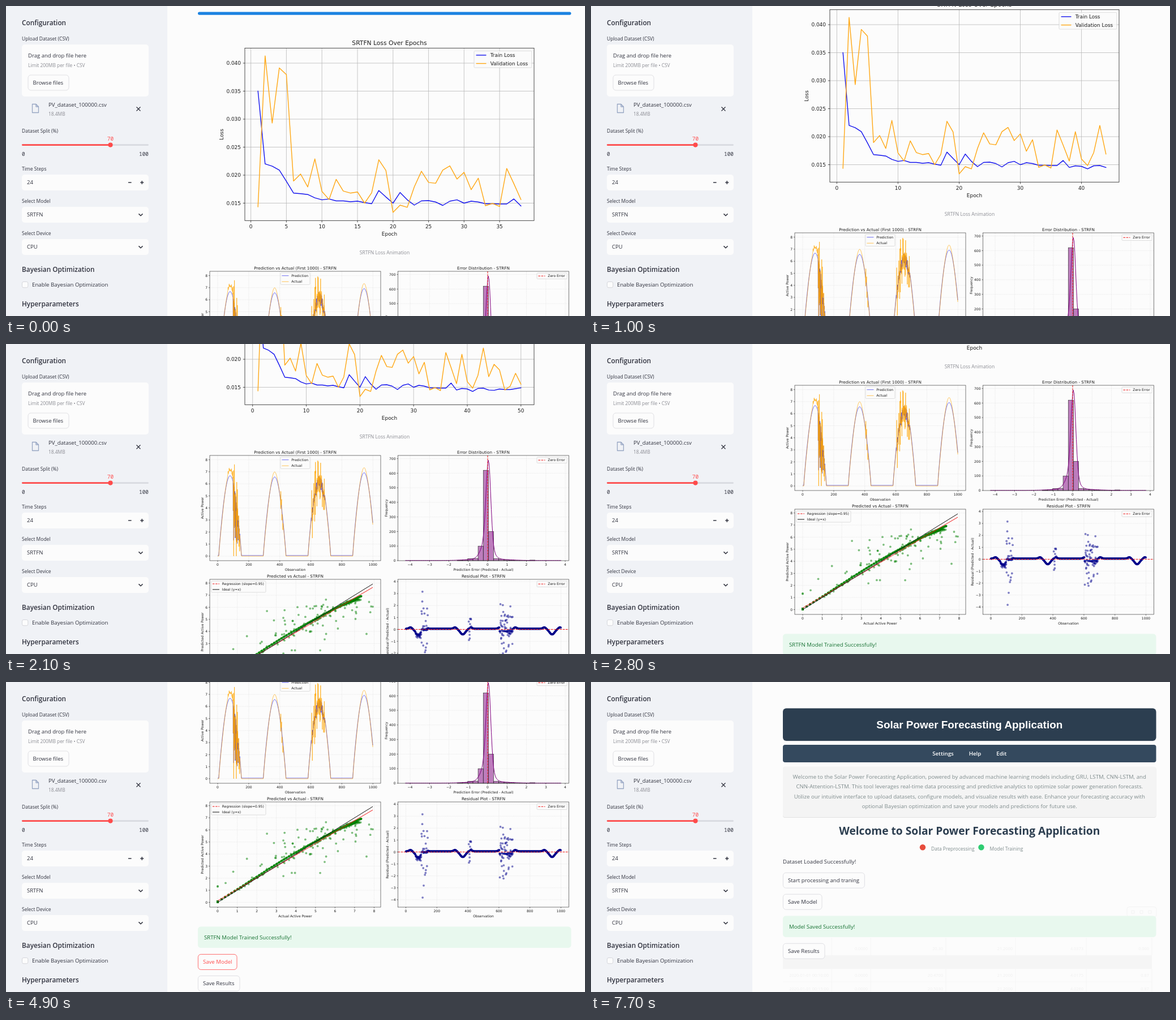
Write an HTML page that moves like this. It is 1023 by 548 pixels and loops after 7.8 s.

```html
<!DOCTYPE html>
<html lang="en">
<head>
<meta charset="utf-8">
<title>Solar Power Forecasting</title>
<style>
  html, body { margin: 0; width: 100%; height: 100%; overflow: hidden; background: #fcfcfc; }
  svg { display: block; width: 1023px; height: 548px; }
  text { font-family: 'Open Sans', 'Noto Sans', sans-serif; fill: #31333f; white-space: pre; }
  .plot text { font-family: 'DejaVu Sans', sans-serif; fill: #1c1c1c; }
  text.mono { font-family: 'Noto Sans Mono', 'DejaVu Sans Mono', monospace; }
  text.head { font-family: 'Liberation Sans', Arial, sans-serif; }
  .btn rect { fill: #fcfcfc; stroke: #d8d9dd; stroke-width: .8; }
  .hot rect { stroke: #ff4b4b; }
  .hot text { fill: #ff4b4b; }
</style>
</head>
<body>
<svg id="stage" viewBox="0 0 1023 548"></svg>
<script>
const LOOP = 7800;
const INK = '#31333f', RED = '#ff4b4b', PAPER = '#fcfcfc', GREY = '#8c8d94';

// ---------- drawing helpers ----------
const attrs = (o = {}) => Object.entries(o).map(([k, v]) => ` ${k}="${v}"`).join('');
const rect = (x, y, w, h, o) => `<rect x="${x}" y="${y}" width="${w}" height="${h}"${attrs(o)}/>`;
const path = (d, stroke, width, o) =>
  `<path d="${d}" fill="none" stroke="${stroke}" stroke-width="${width}"${attrs(o)}/>`;
const dot = (x, y, r, o) => `<circle cx="${x}" cy="${y}" r="${r}"${attrs(o)}/>`;
// y is the optical middle of the line
const text = (s, x, y, size, o) =>
  `<text x="${x}" y="${(y + size * .36).toFixed(2)}" font-size="${size}"${attrs(o)}>${s}</text>`;
const mid = { 'text-anchor': 'middle' }, end = { 'text-anchor': 'end' };
const fill = (c, o = {}) => ({ style: `fill:${c}`, ...o });
const poly = pts => 'M' + pts.map(p => p[0].toFixed(1) + ' ' + p[1].toFixed(1)).join('L');
const range = (a, b, step = 1) => Array.from({ length: Math.floor((b - a) / step + 1.001) }, (_, i) => a + i * step);
const button = (s, x, y, w, id = '') =>
  `<g class="btn"${id && ` id="${id}"`}>${rect(x, y, w, 27, { rx: 5 })}${text(s, x + 8.5, y + 13.5, 9.65)}</g>`;
const notice = (s, y) =>
  rect(339, y, 659.5, 37.5, { rx: 5, fill: '#e8f8ee' }) + text(s, 350, y + 18.7, 9.65, fill('#177233'));

let seed = 11;
const rnd = () => {
  seed = seed + 0x6D2B79F5 | 0;
  let z = Math.imul(seed ^ seed >>> 15, 1 | seed);
  z = z + Math.imul(z ^ z >>> 7, 61 | z) ^ z;
  return ((z ^ z >>> 14) >>> 0) / 4294967296;
};
const burst = a => a * (2 * rnd() - 1) ** 3;

// ---------- sidebar ----------
function sidebar() {
  const heading = (s, y) => text(s, 28, y, 11.8, { 'font-weight': 600 });
  const label = (s, y) => text(s, 28, y, 8.5);
  const field = (s, y) => rect(28, y, 224, 28, { rx: 5, fill: PAPER }) + text(s, 37, y + 14, 9.5);
  const chevron = y => path(`M234.5 ${y - 1.6}l3.5 3.4 3.5 -3.4`, INK, 1.5);
  return rect(0, 0, 285, 548, { fill: '#f0f2f6' })
    + heading('Configuration', 30) + label('Upload Dataset (CSV)', 57.5)
    + rect(28, 68, 224, 92, { rx: 5, fill: PAPER })
    + text('Drag and drop file here', 39, 87.5, 9.55)
    + text('Limit 200MB per file • CSV', 39, 105, 8.4, fill(GREY))
    + button('Browse files', 39, 122, 72)
    + path('M46.5 173.5h6.5l4.5 4.5v10.5h-11zM53 173.5v4.5h4.5', '#97a6c3', 1.3, { 'stroke-linejoin': 'round' })
    + text('PV_dataset_100000.csv', 75, 175, 9.6) + text('18.4MB', 75, 190.5, 8.4, fill(GREY))
    + path('M230.5 178.5l7 7m0 -7l-7 7', INK, 1.3)
    + label('Dataset Split (%)', 221)
    + text('70', 184.5, 234.5, 9.4, fill(RED, { ...mid, class: 'mono' }))
    + rect(28, 244.2, 224, 2.7, { rx: 1.3, fill: '#d8dae0' }) + rect(28, 244.2, 156, 2.7, { rx: 1.3, fill: RED })
    + dot(184.5, 245.6, 4.1, { fill: RED })
    + text('0', 28, 261.5, 9.4, { class: 'mono' }) + text('100', 252, 261.5, 9.4, { ...end, class: 'mono' })
    + label('Time Steps', 288) + field('24', 298)
    + path('M216 312h5.6M237.3 312h6M240.3 309v6', INK, 1.5)
    + label('Select Model', 345) + field('SRTFN', 355) + chevron(369)
    + label('Select Device', 402) + field('CPU', 412) + chevron(426)
    + heading('Bayesian Optimization', 466)
    + rect(28.5, 487.5, 10.3, 10.3, { rx: 2.5, fill: PAPER, stroke: '#cdced5', 'stroke-width': .8 })
    + text('Enable Bayesian Optimization', 46, 492.5, 9.7)
    + heading('Hyperparameters', 527);
}

// ---------- charts ----------
// p: box, titles, ticks as [label, position] and label offsets
function axes(p) {
  const { x, y, w, h, fs } = p, b = y + h;
  let grid = '', marks = '', labels = '';
  for (const [s, px] of p.xt) {
    grid += `M${px} ${y}V${b}`;
    marks += `M${px} ${b}v${p.tick}`;
    labels += text(s, px, b + p.dx, fs, mid);
  }
  for (const [s, py] of p.yt) {
    grid += `M${x} ${py}h${w}`;
    marks += `M${x} ${py}h${-p.tick}`;
    labels += text(s, x - p.dy, py, fs, end);
  }
  return path(grid, p.grid, p.gw, p.dash && { 'stroke-dasharray': p.dash })
    + path(marks, '#222', p.lw) + labels
    + text(p.title, x + w / 2, y - p.dt, fs * 1.2, mid)
    + text(p.xl, x + w / 2, b + p.dl, fs, mid)
    + `<g transform="translate(${p.ylx} ${y + h / 2}) rotate(-90)">${text(p.yl, 0, 0, fs, mid)}</g>`;
}
const frame = p => rect(p.x, p.y, p.w, p.h, { fill: 'none', stroke: '#222', 'stroke-width': p.lw });
function legend(x, y, w, h, fs, lw, items) {
  const row = h / items.length, len = fs * 2;
  return rect(x, y, w, h, { rx: 1.5, fill: PAPER, 'fill-opacity': .8, stroke: '#ccc', 'stroke-width': .6 })
    + items.map(([s, c, dash], i) => {
      const cy = y + row * (i + .5);
      return path(`M${x + fs * .4} ${cy}h${len}`, c, lw, dash && { 'stroke-dasharray': dash })
        + text(s, x + fs * 3.2, cy, fs);
    }).join('');
}
const num = v => String(v).replace('-', '−');
const ticks = (vals, f) => vals.map(v => [num(v), +f(v).toFixed(1)]);

const train = [35, 22, 21.6, 20.9, 18.9, 16.8, 16.7, 16.55, 15.95, 15.6, 15.75, 15.4, 15.4, 15.25, 15.35, 15.1, 14.9,
  17.25, 16.1, 15, 16.9, 15.6, 14.65, 15.4, 15.45, 15.2, 14.6, 15.35, 15.6, 15, 15.35, 15.2, 14.9, 14.9, 14.85, 14.85,
  15.75, 14.5, 14.8, 14.7, 14.25, 14.8, 14.85, 14.5, 14.45, 14.7, 14.6, 14.6, 14.75, 14.9];
const valid = [14.35, 41.3, 29.3, 39.15, 37.95, 18.95, 20.2, 17.9, 22.9, 17.1, 15.65, 19.25, 17.15, 16.8, 17, 15, 16.85,
  22.75, 20.85, 13.35, 14.65, 14.25, 17.9, 20.7, 18.7, 18.55, 20.9, 21.65, 19.3, 20.5, 17.4, 19.45, 14.55, 14.95, 14.4,
  21.2, 18.5, 15.65, 20.9, 16, 14.85, 17.15, 22, 16.9, 19.1, 18.1, 14.5, 15.2, 17.5, 15.55];

function lossChart(n) {
  const X = e => 445.2 + (e - 1) / (n - 1) * 464.6, Y = v => 348.5 - (v - 15) * 9.9;
  const line = data => poly(data.slice(0, n).map((v, i) => [X(i + 1), Y(v)]));
  const xmax = n + (n - 1) * .05;
  const p = {
    x: 422, y: 74.5, w: 511, h: 304.8, fs: 8.95, lw: .8, tick: 3.2, dx: 10.5, dy: 7, dt: 9.7, dl: 23, ylx: 381,
    grid: '#b4b4b4', gw: .75, title: 'SRTFN Loss Over Epochs', xl: 'Epoch', yl: 'Loss',
    xt: ticks(range(0, xmax, n < 42 ? 5 : 10), X),
    yt: range(15, 40, 5).map(v => [(v / 1000).toFixed(3), Y(v)])
  };
  const join = { 'stroke-linejoin': 'round', 'stroke-linecap': 'square' };
  return axes(p) + path(line(train), '#1414ee', 1.4, join) + path(line(valid), '#ffa816', 1.4, join) + frame(p)
    + legend(827, 79.5, 102, 29.5, 8.95, 1.4, [['Train Loss', '#1414ee'], ['Validation Loss', '#ffa816']]);
}

// Four days of output; [middle, peak]
const days = [[80, 6.62], [367, 6.52], [655, 6.62], [943, 6.87]];
const series = range(0, 999).map(t => {
  let pred = .05, act = 0;
  for (const [c, peak] of days) {
    const u = (t - c) / 73;
    if (Math.abs(u) >= 1) continue;
    pred = .05 + peak * Math.cos(u * Math.PI / 2) ** .9;
    act = pred - .05 - .12 * Math.exp(-(((Math.abs(t - c) - 50) / 14) ** 2)) + .47 * Math.exp(-(((t - c) / 24) ** 2));
  }
  if (t > 62 && t < 100) act += rnd() ** 3 * .5;
  if (t >= 100 && t < 142) {
    if (rnd() < .6) pred *= .2 + .75 * rnd();
    act = pred + burst(t < 125 ? 4.2 : 1.8);
  }
  if (t > 405 && t < 424) act += burst(1);
  if (t > 603 && t < 690) {
    pred *= 1 - .16 * rnd();
    act = pred + .15 + burst(2.3);
  }
  return [t, Math.max(pred, .03), Math.min(Math.max(act, 0), 7.93)];
});

const small = {
  w: 302, h: 186, fs: 6.03, lw: .6, tick: 2, dx: 7.3, dy: 4, dt: 6, dl: 15.7, grid: '#dedede', gw: .5, dash: '1.8 .9'
};
const DASH = '3.6 1.6';

function powerChart() {
  const X = v => 374 + v * .2743, Y = v => 647 - v * 21.3;
  const p = {
    ...small, x: 360, y: 469, ylx: 347, title: 'Prediction vs Actual (First 1000) - STRFN', xl: 'Observation',
    yl: 'Active Power', xt: ticks(range(0, 1000, 200), X), yt: ticks(range(0, 8), Y)
  };
  const line = k => poly(series.map(s => [X(s[0]), Y(s[k])]));
  const soft = { 'stroke-opacity': .7, 'stroke-linejoin': 'round' };
  return axes(p) + path(line(1), '#1414ee', .95, soft) + path(line(2), '#ffa500', .95, soft) + frame(p)
    + legend(485, 471.5, 52, 21, 6.03, .95, [['Prediction', '#6767f3'], ['Actual', '#ffc04d']]);
}

function errorChart() {
  const X = v => 851 + v * 34.25, Y = v => 655 - v * .2577;
  const bins = [3, 6, 13, 15, 100, 620, 200, 14, 10, 5, 4, 1, 1, 1, 4];
  const gauss = (v, c, s) => Math.exp(-(((v - c) / s) ** 2) / 2);
  const kde = v => 555 * gauss(v, .04, .12) + 130 * gauss(v, -.05, .26) + 12 * gauss(v, 0, .9) + 1;
  const p = {
    ...small, x: 692.5, y: 469, ylx: 672, title: 'Error Distribution - STRFN',
    xl: 'Prediction Error (Predicted - Actual)', yl: 'Frequency',
    xt: ticks(range(-4, 4), X), yt: ticks(range(0, 700, 100), Y)
  };
  const bars = bins.map((n, i) => rect(797.5 + i * 9.15, Y(n), 9.15, 655 - Y(n),
    { fill: '#800080', 'fill-opacity': .5, stroke: '#222', 'stroke-width': .6 })).join('');
  return axes(p) + bars
    + path(poly(range(-4.25, 3.8, .04).map(v => [X(v), Y(kde(v))])), '#800080', 1)
    + path('M851 469V655', '#f01818', 1, { 'stroke-dasharray': DASH }) + frame(p)
    + legend(938, 472, 53.5, 10.5, 6.03, 1, [['Zero Error', '#f01818', DASH]]);
}

const cloud = (pts, color) =>
  `<g fill="${color}" fill-opacity=".5">${pts.map(([x, y]) => dot(x.toFixed(1), y.toFixed(1), 1.9)).join('')}</g>`;

function scatterChart() {
  const X = v => 374 + v * 34.55, Y = v => 865.5 - v * 21.35;
  const p = {
    ...small, x: 360, y: 688, ylx: 347, title: 'Predicted vs Actual - STRFN', xl: 'Actual Active Power',
    yl: 'Predicted Active Power', xt: ticks(range(0, 8), X), yt: ticks(range(0, 8), Y)
  };
  return axes(p) + cloud(series.map(s => [X(s[2]), Y(s[1])]), '#008000')
    + path(poly([[X(0), Y(.13)], [X(7.93), Y(7.65)]]), '#f01818', 1)
    + path(poly([[X(0), Y(0)], [X(7.93), Y(7.93)]]), '#111', 1) + frame(p)
    + legend(362.5, 691, 96.5, 20, 6.03, 1, [['Regression (slope=0.95)', '#f01818', DASH], ['Ideal (y=x)', '#111']]);
}

function residualChart() {
  const X = v => 706.5 + v * .274, Y = v => 776.5 - v * 21.1;
  const p = {
    ...small, x: 692.5, y: 688, ylx: 674, title: 'Residual Plot - STRFN', xl: 'Observation',
    yl: 'Residual (Predicted - Actual)', xt: ticks(range(0, 1000, 200), X), yt: ticks(range(-4, 4), Y)
  };
  return axes(p) + cloud(series.map(s => [X(s[0]), Y(s[1] - s[2])]), '#00008b')
    + path('M692.5 776.5h302', '#f01818', 1, { 'stroke-dasharray': DASH }) + frame(p)
    + legend(938, 691, 53.5, 10.5, 6.03, 1, [['Zero Error', '#f01818', DASH]]);
}

// ---------- pages ----------
function results() {
  return rect(339, 10.4, 659.5, 5.3, { rx: 2.6, fill: '#1c83e1' })
    + `<g id="zoom">${rect(978, -2, 24, 32, { rx: 4, fill: '#fafafa' })}`
    + path('M985.2 12.2v-1.7h2M988.8 10.5h2v1.7M990.8 14.8v1.7h-2M987.2 16.5h-2v-1.7', '#8b8c93', .9) + '</g>'
    + '<g class="plot" id="loss"></g>'
    + text('SRTFN Loss Animation', 669, 436, 8.5, fill(GREY, mid))
    + `<g class="plot">${powerChart()}${errorChart()}${scatterChart()}${residualChart()}</g>`
    + notice('SRTFN Model Trained Successfully!', 908.5)
    + button('Save Model', 339.4, 957.4, 68.6, 'saveA') + button('Save Results', 339.4, 995.4, 73.6);
}

function staleTable() {
  const cols = [425, 494, 627, 750, 875, 991], ink = fill('#efefef', end);
  const row = (y, cells) => cells.map((s, i) => text(s, cols[i] - 5, y, 7.4, ink)).join('');
  return rect(339, 483, 652, 24, { fill: '#f5f5f5' })
    + path(cols.map(x => `M${x} 452V483M${x} 507V548`).join('') + 'M339 530h652', '#f4f4f4', .8)
    + row(471, ['', '0.0000', '20.30', '21.2000', '4.0373', '0.000'])
    + row(518, ['2020-01-01 00:10:00', '0.0000', '20.4700', '21.2000', '4.0175', '0.87'])
    + row(542, ['2020-01-01 00:15:00', '0.0000', '20.5030', '21.2000', '4.0260', '0.87'])
    + rect(947, 397.5, 52, 18, { rx: 4, fill: 'none', stroke: '#f4f4f4' })
    + path('M955 404h5v5h-5zM970 404h5v5h-5zM985 404h5v5h-5z', '#f2f2f2', 1);
}

function welcome() {
  const intro = [
    'Welcome to the Solar Power Forecasting Application, powered by advanced machine learning models including GRU, LSTM, CNN-LSTM, and',
    'CNN-Attention-LSTM. This tool leverages real-time data processing and predictive analytics to optimize solar power generation forecasts.',
    'Utilize our intuitive interface to upload datasets, configure models, and visualize results with ease. Enhance your forecasting accuracy with',
    'optional Bayesian optimization and save your models and predictions for future use.'];
  const white = o => fill('#fff', { ...mid, ...o }), grey = o => fill('#7f8c8d', o);
  const shade = (y, h, rx) => rect(339, y + 1, 659.5, h, { rx, fill: '#000', opacity: .1 });
  return shade(46.5, 57.5, 6) + rect(339, 46.5, 659.5, 57.5, { rx: 6, fill: '#2c3e50' })
    + text('Solar Power Forecasting Application', 668.8, 75, 18.9, white({ class: 'head', 'font-weight': 700 }))
    + rect(339, 111, 659.5, 31, { rx: 4, fill: '#34495e' })
    + [['Settings', 622], ['Help', 678.5], ['Edit', 725.3]]
      .map(([s, x]) => text(s, x, 126.3, 9.75, white({ 'font-weight': 600 }))).join('')
    + shade(149.5, 89.5, 4) + rect(339, 149.5, 659.5, 89.5, { rx: 4, fill: '#f4f4f4' })
    + intro.map((s, i) => text(s, 668.8, 167.5 + i * 17.4, 9.68, grey(mid))).join('')
    + text('Welcome to Solar Power Forecasting Application', 668.8, 263, 19.2, fill('#2c3e50', { ...mid, 'font-weight': 700 }))
    + dot(586, 292.3, 5.2, { fill: '#e74c3c' }) + text('Data Preprocessing', 601, 294.5, 8.5, grey())
    + dot(689.5, 292.3, 5.2, { fill: '#2ecc71' }) + text('Model Training', 704.5, 294.5, 8.5, grey())
    + text('Dataset Loaded Successfully!', 339, 317.5, 9.65)
    + button('Start processing and traning', 339.4, 337.2, 144)
    + staleTable()
    + button('Save Model', 339.4, 375.2, 68.6, 'saveB')
    + `<g id="saved">${notice('Model Saved Successfully!', 413.5)}</g>`
    + `<g id="below">${button('Save Results', 339.4, 462.2, 73.6)}</g>`;
}

const stage = document.getElementById('stage');
stage.innerHTML = `<g id="results">${results()}</g><g id="welcome">${welcome()}</g>${sidebar()}`;
const $ = id => document.getElementById(id);

// ---------- timeline: [ms, value], each value holds until the next ----------
const epochAt = [0, 200, 400, 500, 700, 900, 1000, 1200, 1400, 1600, 1800, 1900, 2100].map((t, i) => [t, 38 + i]);
const scrollAt = [[0, 0], [800, 15], [900, 56], [1000, 68], [1200, 83], [1300, 124], [1400, 136], [1500, 185], [1600, 204],
  [1900, 219], [2000, 260], [2100, 272], [2300, 287], [2400, 328], [2500, 340], [2700, 355], [2800, 396], [2900, 408],
  [3700, 457], [3800, 476]];
const zoomAt = [[0, 0], [200, .25], [300, .55], [400, .8], [500, 1]];
const savedAt = [[0, 0], [5700, .6], [5800, 1]];
const hold = (steps, t) => {
  let v = steps[0][1];
  for (const [at, value] of steps) if (t >= at) v = value;
  return v;
};

let drawn = 0;
function render(t) {
  const second = t >= 5400, n = hold(epochAt, t), saved = hold(savedAt, t);
  if (n !== drawn) {
    $('loss').innerHTML = lossChart(n);
    drawn = n;
  }
  $('results').style.display = second ? 'none' : '';
  $('welcome').style.display = second ? '' : 'none';
  $('results').setAttribute('transform', `translate(0 ${-hold(scrollAt, t)})`);
  $('zoom').setAttribute('opacity', hold(zoomAt, t));
  $('saveA').classList.toggle('hot', t >= 4900);
  $('saveB').classList.toggle('hot', t < 7700);
  $('saved').setAttribute('opacity', saved);
  $('below').setAttribute('transform', `translate(0 ${saved ? 0 : -48.7})`);
}

const start = performance.now();
function tick() {
  render((performance.now() - start) % LOOP);
  requestAnimationFrame(tick);
}
tick();
</script>
</body>
</html>
```
